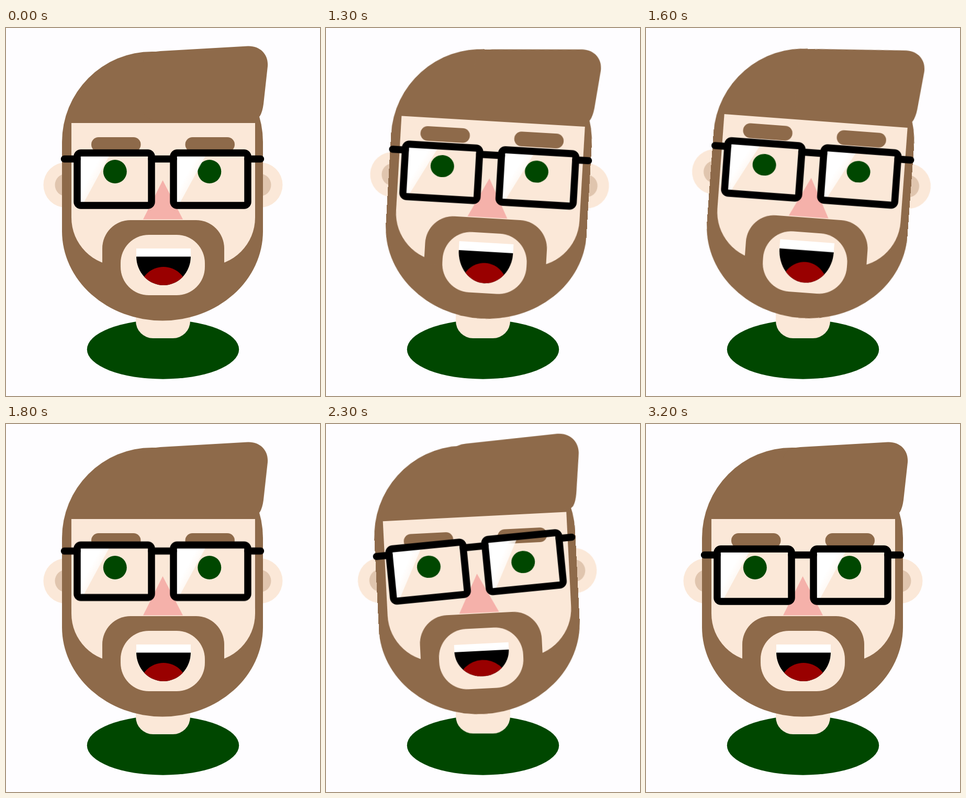
An HTML page without scripts that plays this animation: 600 px wide and 701 px high, repeating every 3300 ms.

```html
<!DOCTYPE html>
<html lang="en">
<head>
<meta charset="utf-8">
<title>Nodding face</title>
<style>
  html, body { margin: 0; width: 100%; height: 100%; overflow: hidden; background: #fefdff; }
  svg { display: block; width: 600px; height: 701px; }

  .hair { fill: #8e6a4a; }
  .skin { fill: #fbe8d8; }
  .green { fill: #004700; }
  .frame { fill: none; stroke: #000; stroke-width: 13.5; stroke-linecap: round; }

  .move { animation: 3300ms ease infinite; }
  .head { animation-name: tilt; transform-origin: 300px 510px; }
  .neck { animation-name: lift; }
  .ears { animation-name: perk; }
  .quiff { animation-name: puff; transform-origin: 380px 105px; }
  .brows { animation-name: raise; }
  .eyes { animation-name: squint; transform-origin: 300px 251px; }
  .mouth { animation-name: talk; transform-origin: 301px 490px; }
  .glasses { animation-name: slip; transform-origin: 299px 288px; }

  /* right tilt 37.3-54.55%, left tilt 54.55-76% */
  @keyframes tilt {
    0%, 37.3%, 54.55%, 76%, 100% { transform: translateY(0) rotate(0deg); }
    43.9%, 47% { transform: translateY(-7px) rotate(6deg); }
    63%, 67% { transform: translateY(-10.6px) rotate(-6deg); }
  }
  @keyframes lift {
    0%, 54.55%, 76%, 100% { transform: translateY(0); }
    63%, 67% { transform: translateY(-3px); }
  }
  @keyframes perk {
    0%, 37.3%, 54.55%, 76%, 100% { transform: translateY(0); }
    43.9%, 47% { transform: translateY(-10px); }
    63%, 67% { transform: translateY(-11.5px); }
  }
  @keyframes puff {
    0%, 54.55%, 76%, 100% { transform: scale(1); }
    63%, 67% { transform: scale(1.09); }
  }
  @keyframes raise {
    0%, 37.3%, 54.55%, 100% { transform: translateY(0); }
    43.9%, 47% { transform: translateY(-19px); }
  }
  @keyframes squint {
    0%, 37.3%, 54.55%, 76%, 100% { transform: scaleY(1); }
    43.9%, 47%, 63%, 67% { transform: scaleY(.88); }
  }
  @keyframes talk {
    0%, 37.3%, 54.55%, 76%, 100% { transform: translateY(0) scaleY(1); }
    43.9%, 47% { transform: translateY(0) scaleY(1.19); }
    63%, 67% { transform: translateY(-8.5px) scaleY(.78); }
  }
  @keyframes slip {
    0%, 37.3%, 88%, 100% { transform: translate(0, 0) rotate(0deg); }
    43.9%, 54.55%, 76%, 80% { transform: translate(0, -7.5px) rotate(0deg); }
    60.6% { transform: translate(6px, -14px) rotate(-2.1deg); }
    69.7% { transform: translate(-.5px, -11px) rotate(-2.75deg); }
  }
</style>
</head>
<body>
<svg viewBox="0 0 600 701">
  <defs>
    <linearGradient id="glare" gradientUnits="userSpaceOnUse" x1="136" y1="258" x2="176" y2="280">
      <stop offset=".7" stop-color="#fff"/>
      <stop offset="1" stop-color="#fff" stop-opacity=".75"/>
    </linearGradient>
    <clipPath id="lips"><path d="M249 435A52 55 0 0 0 353 435Z"/></clipPath>
    <g id="ear">
      <circle class="skin" cx="114.500" cy="299" r="43"/>
      <circle cx="115" cy="299" r="21.500" fill="#e0c5ae"/>
    </g>
    <g id="lens">
      <path d="M142 244H197L149 332H142Z" fill="url(#glare)"/>
      <rect class="frame" x="136" y="238" width="142" height="100" rx="7"/>
    </g>
  </defs>

  <ellipse class="green" cx="300" cy="612.200" rx="145.200" ry="56.500"/>
  <rect class="skin move neck" x="248" y="500" width="104" height="91" rx="33"/>

  <g class="move head">
    <g class="move ears">
      <use href="#ear"/>
      <use href="#ear" transform="matrix(-1 0 0 1 600 0)"/>
    </g>

    <path class="hair" d="M107 217A172 172 0 0 1 279 45H319A172 172 0 0 1 491 217V387A192 170.500 0 0 1 107 387Z"/>
    <path class="hair move quiff" d="M258 140V85Q258 46 295 44L462 34.500C485 33.500 502 50 500 73L492 145Q490 160 485 168Q478 176 460 176H290Q258 176 258 140Z"/>
    <path class="skin" d="M125 181H476V361A92 92 0 0 1 384 453H217A92 92 0 0 1 125 361Z"/>
    <path class="hair" d="M184 460V420A54 54 0 0 1 238 366H363A54 54 0 0 1 417 420V460Z"/>
    <rect class="skin" x="219" y="394" width="161" height="115" rx="54"/>

    <g class="move mouth">
      <path d="M249 435A52 55 0 0 0 353 435Z"/>
      <circle cx="301" cy="501" r="46" fill="#990000" clip-path="url(#lips)"/>
      <rect x="249" y="420" width="104" height="15.500" fill="#fff"/>
    </g>

    <path d="M299.500 290L338 364.500H262Z" fill="#f5b1aa"/>

    <g class="hair move brows">
      <rect x="163" y="208" width="94.500" height="28" rx="14"/>
      <rect x="342.500" y="208" width="94.500" height="28" rx="14"/>
    </g>
    <g class="green move eyes">
      <circle cx="208.300" cy="273.500" r="22.500"/>
      <circle cx="388.800" cy="273.500" r="22.500"/>
    </g>

    <g class="move glasses">
      <use href="#lens"/>
      <use href="#lens" x="184"/>
      <path class="frame" d="M111.500 249.500H136M278 249.500H320M462 249.500H486.500"/>
    </g>
  </g>
</svg>
</body>
</html>
```
